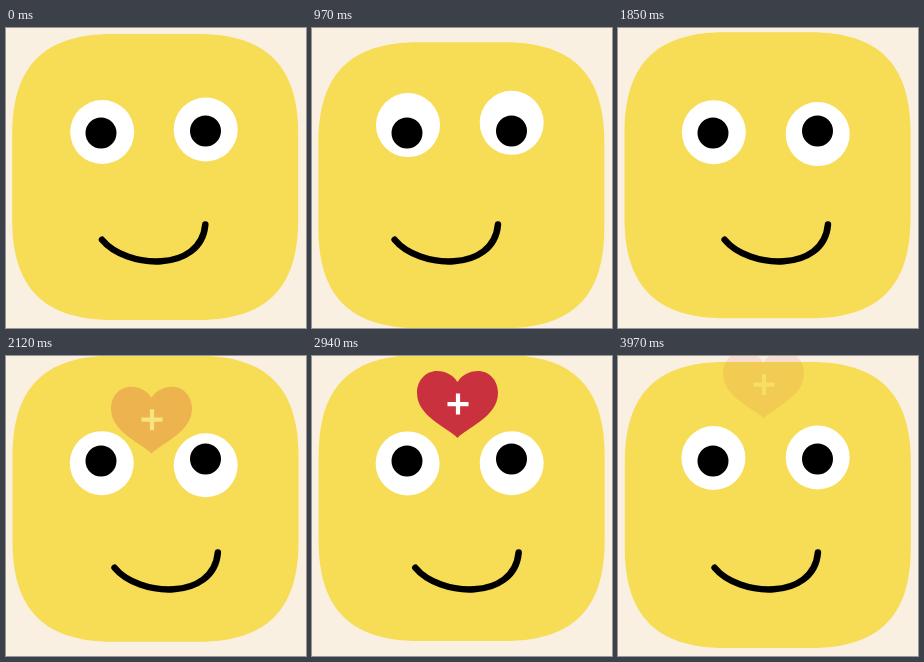
An HTML page for the animation above (4 s loop, 300x300 px).

```html
<!DOCTYPE html>
<html lang="en">
<head>
<meta charset="utf-8">
<title>Happy face</title>
<style>
html, body { margin: 0; width: 100%; height: 100%; overflow: hidden; background: #faf0e2; }
svg { display: block; width: 100%; height: 100%; }
</style>
</head>
<body>
<svg viewBox="0 0 300 300">
  <path id="body" fill="#f7dc55" d="M-143-43C-143-111-111-143-43-143H43C111-143 143-111 143-43V43C143 111 111 143 43 143H-43C-111 143-143 111-143 43Z"/>
  <g fill="#fff">
    <circle id="leftEye" r="32"/>
    <circle id="rightEye" r="32"/>
  </g>
  <circle cx="95" cy="105" r="15.5"/>
  <circle cx="199.5" cy="103" r="15.5"/>
  <path id="mouth" d="M96 211.8C120 241 195 245 199.3 196.6" fill="none" stroke="#000" stroke-width="6.5" stroke-linecap="round"/>
  <g id="heart">
    <path fill="#ca313e" d="M-.5 34C-9 24-41 13-41-11C-41-24-32-33-21-33C-12-33-5-29-.5-22C4-29 11-33 20-33C31-33 40-24 40-11C40 13 8 24-.5 34Z"/>
    <path d="M-10.5 0H10.5M0-10.5V10.5" stroke="#fff" stroke-width="4.2"/>
  </g>
</svg>
<script>
const LOOP = 4000;
const el = id => document.getElementById(id);
const [body, leftEye, rightEye, mouth, heart] =
  ['body', 'leftEye', 'rightEye', 'mouth', 'heart'].map(el);

// Keys are [time, value] pairs, eased in and out between neighbours.
function track(t, keys) {
  const i = keys.findIndex(k => k[0] > t);
  const [t0, a] = keys[i - 1], [t1, b] = keys[i];
  const p = (t - t0) / (t1 - t0);
  return a + (b - a) * p * p * (3 - 2 * p);
}

const place = (node, x, y) => node.setAttribute('transform', `translate(${x} ${y})`);
const clamp = v => Math.max(0, Math.min(1, v));

function draw(t) {
  const p = t / LOOP;
  place(body, 149.2 + 0.6 * p, track(t, [[0, 149], [1070, 157.5], [2470, 140], [LOOP, 149]]));
  place(leftEye, 96.2 - 0.8 * p, track(t, [[0, 104], [1050, 97], [2470, 109], [LOOP, 102]]));
  place(rightEye, 199.7, track(t, [[0, 101.5], [950, 94.8], [2300, 110], [LOOP, 101.5]]));
  place(mouth, track(t, [[0, 0], [880, -13.8], [2045, 12.6], [LOOP, 0.6]]), 0);
  place(heart, 146, 66 - 0.019 * (t - 2000));
  heart.setAttribute('opacity', clamp((t - 2000) / 525) * clamp((4020 - t) / 520));
}

function tick() {
  draw(performance.now() % LOOP);
  requestAnimationFrame(tick);
}
tick();
</script>
</body>
</html>
```
